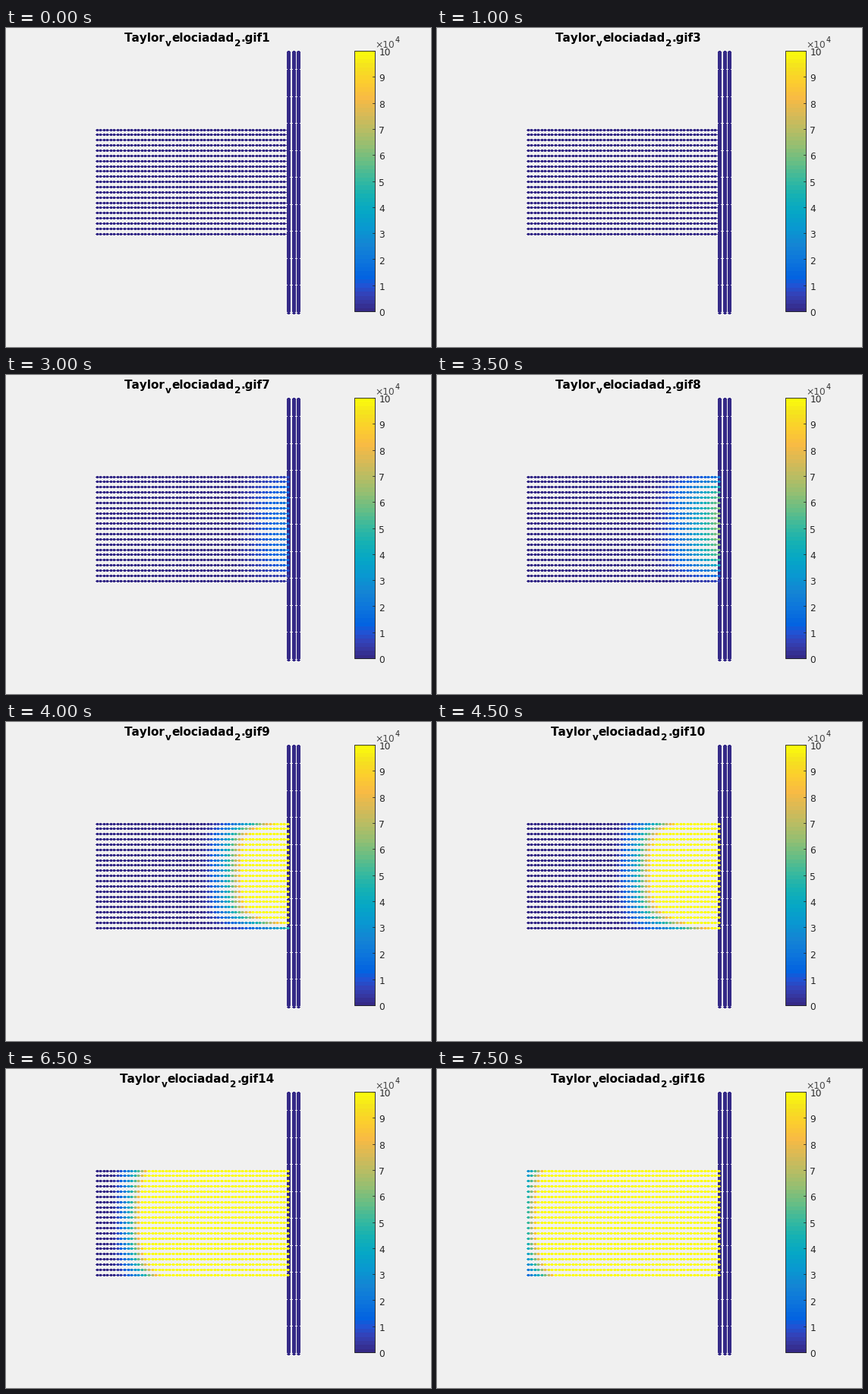
Write a matplotlib script that moves like this. It is 560 by 420 pixels and loops after 8000 ms.

```python
import numpy as np
import matplotlib.pyplot as plt
from matplotlib.animation import FuncAnimation
from matplotlib.collections import PolyCollection
from matplotlib.colors import ListedColormap, to_rgb
from matplotlib.patches import Rectangle

W, H, DPI = 560, 420, 72          # at 72 dpi one point is one pixel
FRAMES, STEP_MS = 16, 500
INK = "#262626"

plt.rcParams["font.family"] = "DejaVu Sans"
plt.rcParams["text.kerning_factor"] = 6


def make_cmap(levels=64):
    pos = [0, 2, 4, 6, 8, 12, 16, 20, 24, 28, 32, 36, 40, 44, 48, 52, 56, 60, 63]
    stops = ("352a87 3637a0 3243ba 2053d4 0363e1 0d75dc 1485d4 0998d1 06a7c6 "
             "15b1b4 38b99e 65be86 92bf73 b7bd64 d9ba56 f8bb44 fcce2e f5e41d fbfc0c")
    rgb = np.array([to_rgb("#" + s) for s in stops.split()])
    k = np.arange(levels)
    return ListedColormap(np.column_stack([np.interp(k, pos, c) for c in rgb.T]))


CMAP = make_cmap()

fig = plt.figure(figsize=(W / DPI, H / DPI), dpi=DPI, facecolor="#f0f0f0")
ax = fig.add_axes([0, 0, 1, 1])
ax.axis("off")


def label(x, y, s, size, color=INK, **kw):
    return ax.text(x, y, s, fontsize=size, color=color, ha="left", va="baseline", **kw)


# Colour bar
BAR_L, BAR_R, BAR_T, BAR_B = 459, 486, 30, 373
ax.imshow(np.arange(64)[:, None], cmap=CMAP, origin="lower", aspect="auto",
          interpolation="nearest", extent=[BAR_L + 1, BAR_R, BAR_B + 1, BAR_T])
ax.add_patch(Rectangle((BAR_L, BAR_T), BAR_R - BAR_L, BAR_B - BAR_T,
                       fill=False, ec=INK, lw=0.9))
for i in range(11):
    y = BAR_B + (BAR_T - BAR_B) * i / 10
    ax.plot([BAR_R - 3, BAR_R], [y, y], color=INK, lw=0.8)
    label(491.5, 379.25 - 34.32 * i, str(i), 12.3)
label(486.5, 26, "\u00d710", 12.3, color="#484848")
label(512.5, 19, "4", 9.8)

# Small cross-shaped dots, snapped to whole pixels
CROSS = np.array([(-2, 0), (-1, 0), (-1, -1), (2, -1), (2, 0), (3, 0),
                  (3, 1), (2, 1), (2, 2), (-1, 2), (-1, 1), (-2, 1)])


def dots(xs, ys):
    centres = np.floor(np.column_stack([xs.ravel(), ys.ravel()]))
    coll = PolyCollection(centres[:, None, :] + CROSS, cmap=CMAP, linewidths=0,
                          edgecolors="none", antialiaseds=False)
    coll.set_array(np.zeros(len(centres)))
    coll.set_clim(0, 10)
    return ax.add_collection(coll)


dots(*np.meshgrid(np.array([372, 379, 385]), 31.34 + 1.029 * np.arange(335)))

COLS, ROWS = 56, 21
gx, gy = np.meshgrid(120 + 4.571 * np.arange(COLS), 134 + 6.86 * np.arange(ROWS))
row = np.arange(ROWS)[:, None]
rod = dots(gx, gy)

ax.set_xlim(0, W)
ax.set_ylim(H, 0)


def wave(n):
    """Load in the rod: a steepening front running left, lagging at the edges."""
    if n < 5:
        return np.zeros_like(gx)
    tip = np.interp(n, [5, 8, 10, 15], [325, 245, 197, 87])
    width = np.interp(n, [5, 6, 7, 8, 11, 13, 15], [600, 365, 131, 67, 51, 45, 43])
    power = np.interp(n, [6, 8], [1.0, 2.3])
    top = np.interp(n, [6, 8, 11, 13], [1.5, 0.64, 0.34, 0.28])
    low = np.interp(n, [6, 8, 11], [3.5, 1.65, 0.62])
    reach = np.interp(n, [8, 11], [1.4, 3.0])
    lag = top * np.exp(-row / reach) + low * np.exp(-(ROWS - 1 - row) / reach)
    d = np.clip(gx - tip, 0, None)
    return np.minimum(10 * (d / (width * (1 + lag))) ** power, 10)


# Title with subscripts, laid out piece by piece and centred
TITLE_X, GAP = 252, 0.4
parts = [label(0, y, s, size, color="black", weight="bold") for s, size, y in
         (("Taylor", 15.2, 18), ("v", 12, 24.5), ("elociadad", 15.2, 18),
          ("2", 12, 24.5), (".gif1", 15.2, 18))]


def set_title(n):
    parts[-1].set_text(f".gif{n}")
    widths = [p.get_window_extent().width * DPI / fig.dpi + GAP for p in parts]
    x = TITLE_X - sum(widths) / 2
    for p, w in zip(parts, widths):
        p.set_x(x)
        x += w


def update(n):
    rod.set_array(wave(n).ravel())
    set_title(n + 1)
    return [rod, *parts]


anim = FuncAnimation(fig, update, frames=FRAMES, interval=STEP_MS,
                     repeat=True, blit=False)
plt.show()
```
